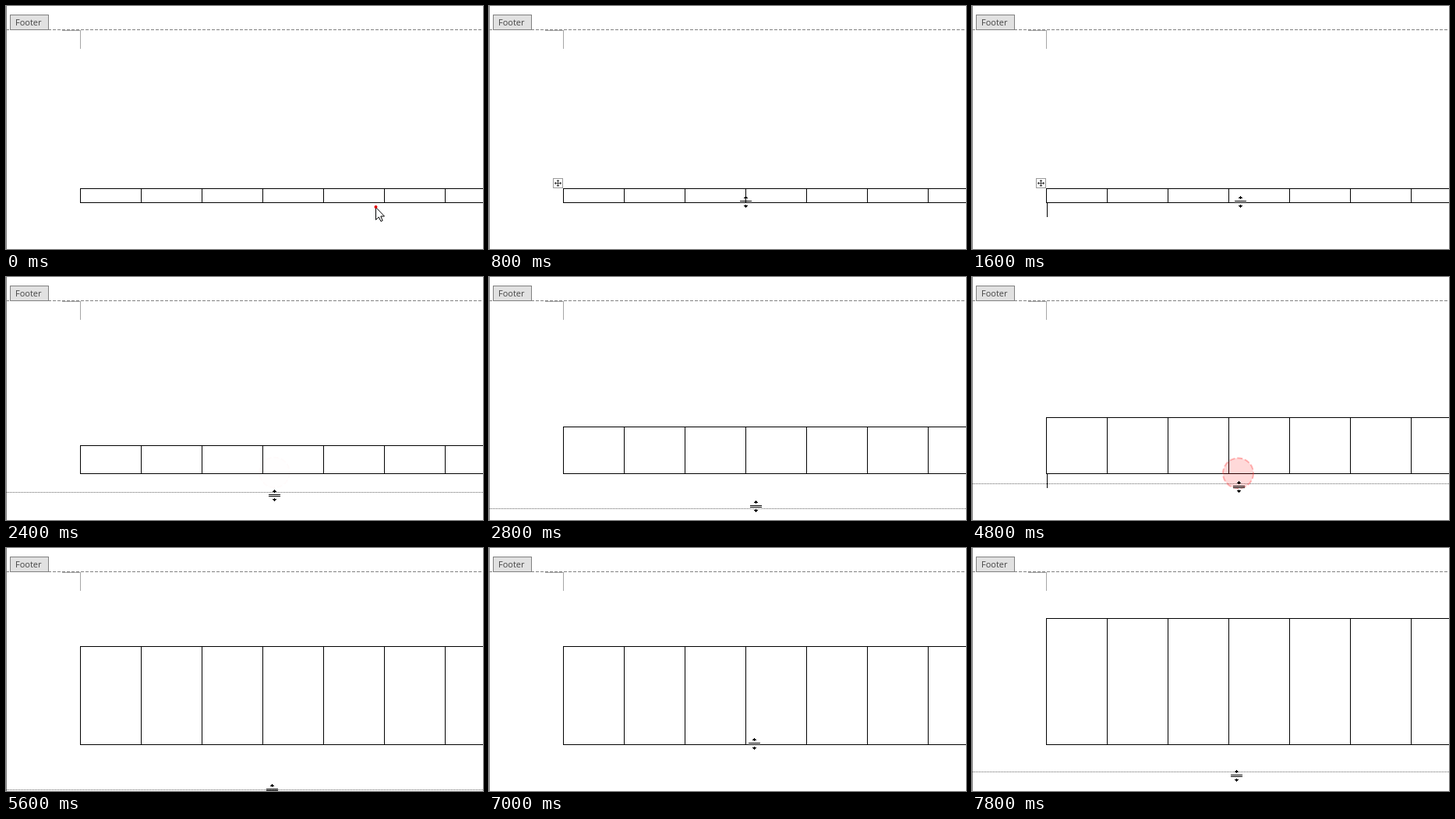
Animation, 612 px wide and 312 px high, one loop 8000 ms. Source, as an HTML page:

```html
<!DOCTYPE html>
<html lang="en">
<head>
<meta charset="utf-8">
<title>Resizing a footer table row</title>
<style>
html, body { margin: 0; width: 100%; height: 100%; overflow: hidden; background: #fff; }
svg { display: block; }
text { font: 11px "Open Sans", "Noto Sans", sans-serif; fill: #444; }
</style>
</head>
<body>
<svg width="612" height="312" viewBox="0 0 612 312" fill="none" shape-rendering="crispEdges">
  <path d="M.5 0V312" stroke="#808080"/>
  <path d="M0 30.5H612" stroke="#808080" stroke-dasharray="4 2"/>
  <path d="M72 31.5H95.5V55" stroke="#a6a6a6"/>
  <path d="M5.5 11.5H54.5V30.5H5.5Z" fill="#e1e1e1" stroke="#808080"/>
  <text x="12" y="25">Footer</text>

  <path id="grid" stroke="#000"/>
  <path id="guide" stroke="#666" stroke-dasharray="1 1"/>
  <path id="caret" d="M96.5 253V271" stroke="#000"/>
  <g id="handle">
    <path d="M82.5 221.5H94.5V233.5H82.5Z" fill="#fff" stroke="#999"/>
    <path d="M88.5 224V231M85 227.5H92M87 224.5H90M87 230.5H90M85.5 226V229M91.5 226V229M88 223.5H89M88 231.5H89M84 227.5H85M92 227.5H93" stroke="#444"/>
  </g>
  <circle id="press" r="19.5" fill="#f00" fill-opacity=".15" stroke="#ff3c3c"
    stroke-opacity=".36" stroke-width="2" stroke-dasharray="7 3" shape-rendering="auto"/>

  <g id="arrow" shape-rendering="auto">
    <path d="M.5 .5V16.5L4.3 13L7 18.5L9.2 17.5L6.8 12H11.5Z" fill="#fff" stroke="#000"/>
    <circle cx=".5" cy="0" r="2" fill="#e00000"/>
  </g>
  <path id="text" stroke="#000"
    d="M-3 -7.5H0M1 -7.5H4M.5 -7V7M-3 7.5H0M1 7.5H4M8 -7.5H18M8 -5.5H16M8 -3.5H18M8 -1.5H14"/>
  <path id="split" stroke="#000"
    d="M-7 -.5H8M-7 1.5H8M.5 -7V-3M-1 -5.5H2M-2 -4.5H3M.5 4V8M-2 5.5H3M-1 6.5H2"/>
</svg>
<script>
const STEP = 200, STEPS = 40, BOTTOM = 252;
const $ = id => document.getElementById(id);

// [step, cursor, x, y]
const path = [
  [0, 'arrow', 474, 258], [1, 'text', 478, 271], [2, 'text', 440, 266], [3, 'split', 375, 251],
  [4, 'split', 329, 251], [8, 'split', 344, 251], [9, 'split', 344, 251], [10, 'split', 344, 258],
  [12, 'split', 344, 280], [15, 'split', 341, 301], [16, 'text', 341, 290], [18, 'text', 341, 261],
  [19, 'text', 341, 255], [20, 'text', 341, 255], [21, 'text', 341, 254], [22, 'split', 342, 251],
  [23, 'split', 342, 257], [24, 'split', 342, 269], [26, 'split', 342, 296], [28, 'split', 341, 310],
  [29, 'text', 341, 306], [33, 'text', 341, 262], [34, 'split', 340, 251], [35, 'split', 340, 251],
  [36, 'split', 340, 262], [38, 'split', 339, 280], [39, 'split', 339, 292]
];

// Each drag: guide positions, row heights in units of 6px, and where the button went down
const drags = [
  { at: 10, guide: [254, 265, 276, 287, 297], rows: [3, 4, 6, 8, 10, 11], x: 344.5, y: 251 },
  { at: 23, guide: [254, 265, 279, 292, 302, 310], rows: [11, 12, 14, 18, 20, 21], x: 341.5, y: 252 },
  { at: 36, guide: [258, 266, 275, 287], rows: [21, 23, 25, 27], x: 340.5, y: 252 }
];
const fade = { 10: 1, 11: .4, 12: .04, 24: 1, 25: .4, 36: 1, 37: .4 };

function show(id, on) {
  $(id).setAttribute('visibility', on ? 'visible' : 'hidden');
}

function drawCursor(n) {
  const i = path.findLastIndex(k => k[0] <= n);
  const [start, kind, x, y] = path[i];
  const [end, , x2, y2] = path[i + 1] || [start + 1, kind, x, y];
  const mix = (a, b) => Math.round(a + (b - a) * (n - start) / (end - start));
  for (const id of ['arrow', 'text', 'split']) show(id, id === kind);
  $(kind).setAttribute('transform', `translate(${mix(x, x2)} ${mix(y, y2)})`);
}

function drawTable(n) {
  const drag = drags.findLast(d => d.at <= n);
  const k = drag ? n - drag.at : 0;
  const rows = drag ? drag.rows[Math.min(k, drag.rows.length - 1)] : 3;
  const top = BOTTOM - rows * 6;
  let d = `M95 ${top + .5}H612M95 ${BOTTOM + .5}H612`;
  for (let x = 95.5; x < 612; x += 78) d += `M${x} ${top}V${BOTTOM}`;
  $('grid').setAttribute('d', d);

  const guide = drag && drag.guide[k];
  show('guide', guide);
  if (guide) $('guide').setAttribute('d', `M1 ${guide + .5}H612`);

  show('press', fade[n]);
  if (fade[n]) {
    $('press').setAttribute('cx', drag.x);
    $('press').setAttribute('cy', drag.y);
    $('press').setAttribute('opacity', fade[n]);
  }
}

function frame() {
  const n = Math.floor(performance.now() / STEP) % STEPS;
  drawTable(n);
  drawCursor(n);
  show('handle', n >= 3 && n < 10);
  show('caret', n >= 8 && n % 8 < 2);
  requestAnimationFrame(frame);
}
frame();
</script>
</body>
</html>
```
